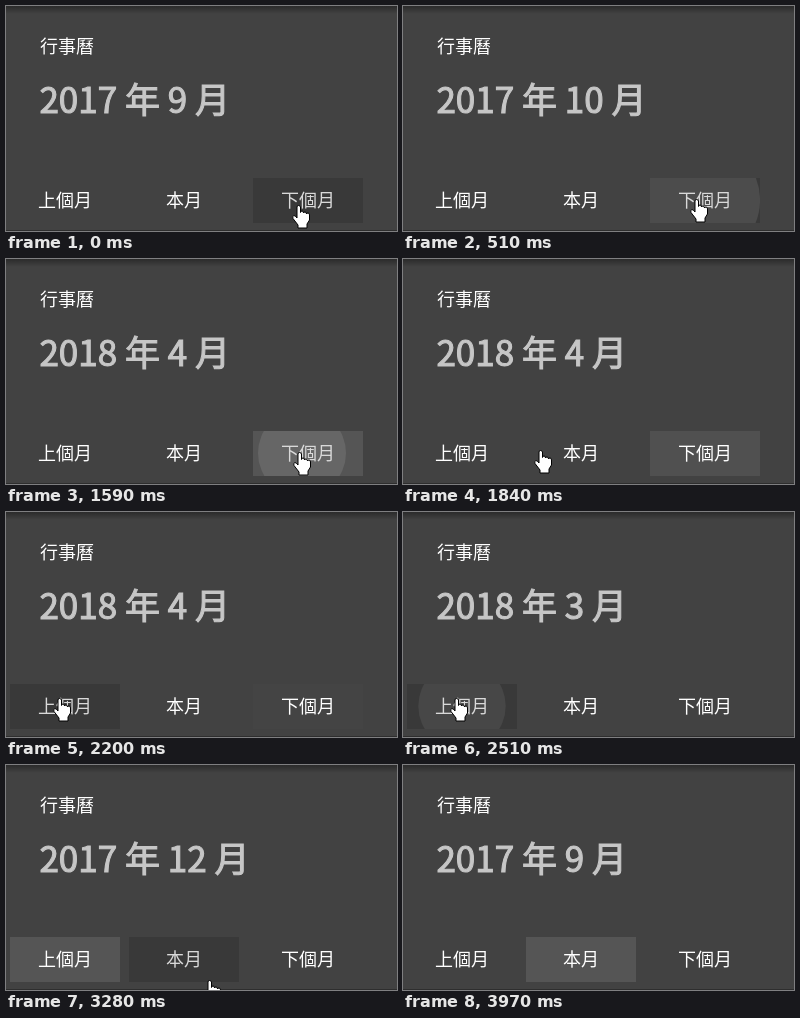
An HTML page that plays this animation: 391 px wide and 225 px high, repeating every 4.05 s.

```html
<!DOCTYPE html>
<html lang="zh-Hant">
<head>
<meta charset="utf-8">
<style>
html, body { margin: 0; height: 100%; overflow: hidden; background: #424242; }
svg { display: block; }
text { font: 300 18px "Noto Sans CJK TC", "Noto Sans CJK", sans-serif; fill: #fff; }
#title { font-size: 35px; font-weight: 400; fill: #c6c6c6; stroke: #c6c6c6; stroke-width: 1.1px; }
.label { text-anchor: middle; }
</style>
</head>
<body>
<svg id="stage" width="391" height="225">
  <defs>
    <linearGradient id="shade" x2="0" y2="1">
      <stop stop-opacity=".35"/>
      <stop offset="1" stop-opacity="0"/>
    </linearGradient>
  </defs>
  <rect width="391" height="225" fill="#424242"/>
  <rect width="391" height="8" fill="url(#shade)"/>
  <rect y="224" width="391" height="1" fill="#2e2e2e"/>
  <text x="34" y="47">行事曆</text>
  <text id="title" x="33.4" y="107"></text>
  <g id="buttons"></g>
  <path id="hand" fill="#fff" stroke="#000" d="M5 13V2Q5 .5 6.500 .5T8.500 2V7.500Q8.500 6 10 6T11.500 8Q11.500 7 13 7T14.500 9Q14.500 8 16 8T17.500 10V15L15 19V23H6V20L1 13.500Q0 11 2 10.500Q3.500 11 5 13Z"/>
</svg>
<script>
const LOOP = 4050, GROW = 380, BASE = 66, HOVER = 57, FOCUS = 85;
const $ = id => document.getElementById(id);
const clamp = v => Math.max(0, Math.min(1, v));
const mix = (a, b, k) => a + (b - a) * k;
const gray = v => `rgb(${v},${v},${v})`;

// hover, pulse and fade are [start, end] times; cx, cy is the pressed point
const buttons = [
  { x: 4, label: '上個月', hover: [2200, 3050], press: 2350, pulse: [2735, 3050], fade: [3280, 3510], cx: 55, cy: 22 },
  { x: 123, label: '本月', hover: [3280, 3880], press: 3591, pulse: [LOOP, LOOP], fade: [LOOP, LOOP + 1], cx: 68, cy: 28 },
  { x: 247, label: '下個月', hover: [0, 1660], press: 270, pulse: [895, 1660], fade: [1660, 2280], cx: 49, cy: 22 }
];
const ups = [430, 660, 900, 1050, 1280, 1430, 1590];
const downs = [2430, 2590, 2740, 2890];
const RESET = 3660;

// time, x, y
const path = [
  [0, 286, 199], [70, 287, 196], [130, 287, 193], [1660, 287, 193], [1740, 232, 192],
  [1820, 130, 191], [1890, 60, 190], [1970, 34, 189], [2130, 34, 189], [2200, 47, 186],
  [2890, 47, 186], [2970, 72, 195], [3050, 135, 206], [3120, 197, 215],
  [3820, 197, 215], [3970, 197, 228]
];

$('buttons').innerHTML = buttons.map(b => `
  <svg x="${b.x}" y="172" width="110" height="45">
    <rect width="110" height="45"/>
    <circle cx="${b.cx}" cy="${b.cy}"/>
    <text class="label" x="55" y="29">${b.label}</text>
  </svg>`).join('');
buttons.forEach((b, i) => {
  [b.rect, b.circle, b.text] = $('buttons').children[i].children;
});

// Motion advances in steps of about 77 ms
function step(t) {
  if (t < 130) return t < 70 ? 0 : 70;
  return 130 + 76.8 * Math.floor((t - 130) / 76.8 + .1);
}

function drawButton(b, t, s) {
  const inside = t >= b.hover[0] && t < b.hover[1];
  const grow = clamp((s - b.press) / GROW);
  const faded = clamp((s - b.fade[0]) / (b.fade[1] - b.fade[0]));
  const growing = grow > 0 && grow < .99;
  const back = grow < .99 ? (inside ? HOVER : BASE) : mix(FOCUS, BASE, faded);
  const pulse = s < b.pulse[0] ? 0 : 1 - clamp((s - b.pulse[1]) / 150);
  b.rect.setAttribute('fill', gray(back));
  b.circle.setAttribute('r', growing ? 87 * grow ** .8 : 44);
  b.circle.setAttribute('fill', gray(growing ? 60 + 25 * grow : 102));
  b.circle.setAttribute('opacity', growing ? 1 : pulse);
  b.text.style.fill = inside ? '#d9d9d9' : '#fff';
}

function draw(t) {
  const s = step(t);
  const passed = list => list.filter(at => t >= at).length;
  const month = 8 + (t < RESET ? passed(ups) - passed(downs) : 0);
  $('title').textContent = `${2017 + Math.floor(month / 12)} 年 ${month % 12 + 1} 月`;
  buttons.forEach(b => drawButton(b, t, s));

  const i = Math.min(path.findLastIndex(p => s >= p[0]), path.length - 2);
  const [a, z] = [path[i], path[i + 1]];
  const k = clamp((s - a[0]) / (z[0] - a[0]));
  $('hand').setAttribute('transform',
    `translate(${Math.round(mix(a[1], z[1], k))} ${Math.round(mix(a[2], z[2], k))})`);
}

function frame() {
  draw(performance.now() % LOOP);
  requestAnimationFrame(frame);
}
frame();
</script>
</body>
</html>
```
